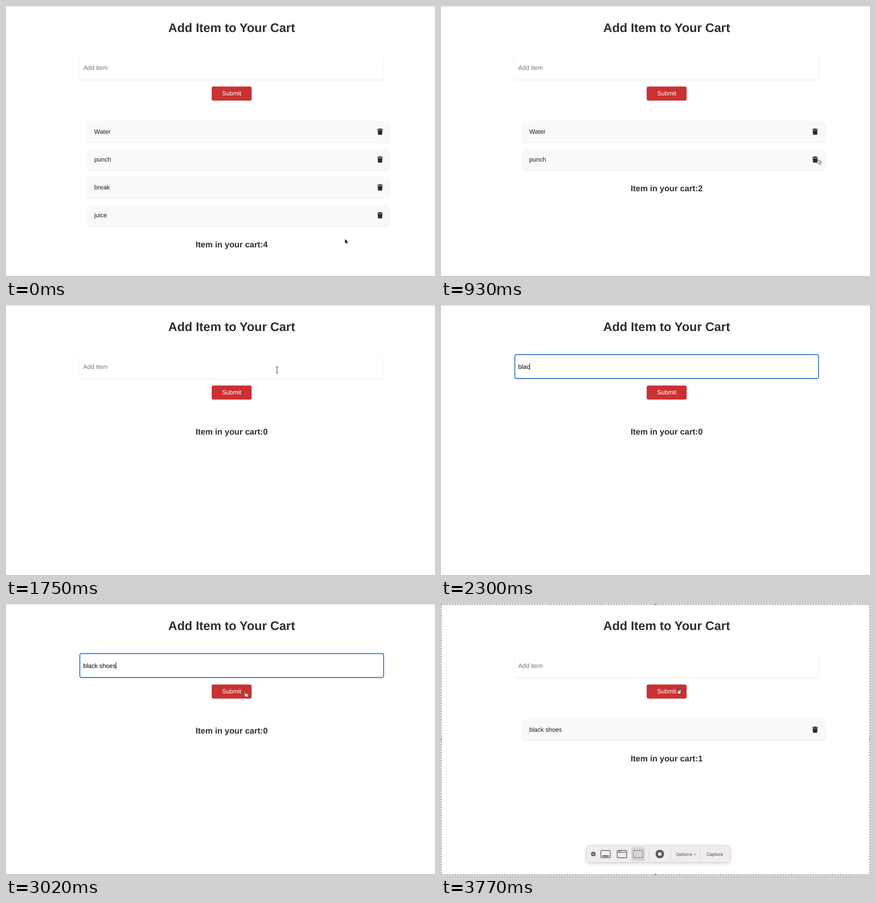
An HTML page for the animation above (4.21 s loop, 942 by 594 pixels).

```html
<!DOCTYPE html>
<html lang="en">
<head>
<meta charset="utf-8">
<title>Cart</title>
<style>
  html, body { margin: 0; width: 100%; height: 100%; overflow: hidden; background: #fff; }
  svg { display: block; font: 13.63px "Liberation Sans", Arial, sans-serif; text-rendering: geometricPrecision; }
  .heading { font-weight: bold; text-anchor: middle; fill: #2e2e2e; }
  .card { filter: drop-shadow(0 1.7px 1.7px rgba(0, 0, 0, .1)); }
  .tool { font: 9.7px Inter, "Open Sans", sans-serif; fill: #484445; }
  .line { fill: none; stroke: #5d5859; stroke-width: 1.4; }
  .rule { stroke: #dcd7d8; }
</style>
</head>
<body>
<svg width="942" height="594" viewBox="0 0 942 594">
  <defs>
    <g id="bin" fill="#2b2b2b">
      <path d="M815.4 269.6h3.2l.8-1.2h4l.8 1.2h3.2v1.8h-12z"/>
      <path d="M816.2 272.3h10.4l-.6 8.6q-.1 1.3-1.4 1.3h-6.4q-1.3 0-1.4-1.3z"/>
    </g>
    <g id="arrow">
      <path d="M0 0V11.2L2.6 8.8 4.3 12.7 6.2 11.9 4.5 8.1H8Z" fill="#000" stroke="#fff" stroke-width=".9"/>
    </g>
    <g id="hand" fill="#fff" stroke="#111" stroke-width=".9" stroke-linejoin="round">
      <path d="M.9 7.4-.9 2.1C-1.4.5.4-.1 1 1.2L2.4 4.8c.6-.7 1.7-.5 2 .2.7-.5 1.7-.2 1.9.5.8-.4 1.8 0 2 .9l.4 2c.2 1.3-.5 2.2-.5 3.4l-5 .6c-.5-1.5-2.8-2.6-4.2-4.3-.6-1 .8-1.7 1.9-.7z"/>
      <path d="M3.4 7.6l.5 2.3M5.1 7.5l.4 2.2M6.7 7.3l.4 2.1" stroke-width=".7"/>
    </g>
    <g id="beam">
      <path d="M-2.6-7q2.6 0 2.6 1.5 0-1.5 2.6-1.5M0-5.5v11M-2.6 7q2.6 0 2.6-1.5 0 1.5 2.6 1.5" fill="none" stroke="#222"/>
    </g>
    <g id="grab" fill="#fff" stroke="#111" stroke-width=".9" stroke-linejoin="round">
      <path d="M-3 1.4-4.3-2.6c-.4-1.3 1.2-1.8 1.7-.6l.6 1.5-.5-3c-.2-1.4 1.5-1.6 1.8-.3l.4 2.8.2-3.3c.1-1.2 1.7-1.2 1.8 0v3.5l.8-2.6c.4-1.2 1.9-.8 1.7.5L3.4 1.6C3.2 3 2.4 3.7 2.4 5.7h-5c-.2-1.5-2.2-2.8-3.3-4.8-.5-1.1.9-1.6 1.7-.7z"/>
      <path d="M-2-1.7l.5 2M-.3-2.2l.2 2.2M1.7-2l-.3 2.1" stroke-width=".7"/>
    </g>
  </defs>

  <path d="M0 1.5H942" stroke="#e2e2e2" stroke-width="1.6"/>
  <path d="M0 593.5H942" stroke="#858585"/>
  <text class="heading" x="495.5" y="57" font-size="27.2">Add Item to Your Cart</text>

  <rect class="card" x="162" y="108" width="667" height="53.3" rx="4" fill="#fff"/>
  <rect id="focus" x="162.2" y="108.7" width="667" height="52.5" rx="3.5" fill="none" stroke="#1962b8" stroke-width="1.7"/>
  <text id="entry" x="169.5" y="139.5"></text>
  <path id="caret" d="M0 127v15.5" stroke="#000"/>

  <rect class="card" x="451.7" y="176.5" width="87.6" height="30.7" rx="3.6" fill="#cb3032"/>
  <text x="495.6" y="196.4" text-anchor="middle" fill="#fff">Submit</text>

  <g id="rows"></g>
  <text id="count" class="heading" x="495.5" font-size="18.25"></text>

  <g id="capture">
    <path d="M0 1.2H942M.5 0V594M941.5 0V594M0 593.3H942" stroke="#fff" stroke-width="1.4"/>
    <path d="M0 1.2H942M.5 0V594M941.5 0V594M0 593.3H942" stroke="#555" stroke-dasharray="3.4 2.6"/>
    <g fill="#777">
      <circle cx="471" r="2.2"/><circle cx="471" cy="593.5" r="2.2"/>
      <circle cy="296.5" r="2.2"/><circle cx="942" cy="296.5" r="2.2"/>
    </g>
    <rect x="319.5" y="529.8" width="315" height="36.7" rx="5.5" fill="#f1edee" stroke="#d3cecf"
      style="filter:drop-shadow(0 2px 4px rgba(0,0,0,.16))"/>
    <circle cx="334.4" cy="548" r="5" fill="#5d5859"/>
    <path d="M332.7 546.3l3.4 3.4m0-3.4l-3.4 3.4" stroke="#f1edee" stroke-width="1.1"/>
    <rect class="line" x="351" y="540.2" width="20.5" height="16" rx="1.8"/>
    <rect x="354" y="551" width="14.5" height="2.8" fill="#5d5859"/>
    <rect class="line" x="387" y="540.2" width="20.7" height="16" rx="1.8"/>
    <path class="line" d="M387 544.4h20.7"/>
    <path class="line" d="M389 542.3h6" stroke-dasharray="1.2 1"/>
    <rect x="418" y="533" width="30" height="30" rx="3.5" fill="#dad5d6"/>
    <rect class="line" x="422.5" y="540.2" width="20.7" height="16" rx="1.5" stroke-dasharray="3.2 1.7"/>
    <circle cx="480.4" cy="548" r="9.4" fill="#5d5859"/>
    <rect x="477" y="544.6" width="6.8" height="6.8" rx="1" fill="#fff"/>
    <path class="rule" d="M456.5 533.5v29M504.5 533.5v29M568.5 530v36"/>
    <text class="tool" x="515.8" y="551.6">Options</text>
    <path class="line" d="M554.2 547.8l2.6 2.4 2.6-2.4" style="stroke-width:1"/>
    <text class="tool" x="583" y="551.6">Capture</text>
  </g>
  <use id="mouse"/>
</svg>
<script>
const LOOP = 4210, STEP = 61.1;
const $ = id => document.getElementById(id);

// [time, value], each holding until the next
const carts = [
  [0, ['Water', 'punch', 'break', 'juice']], [410, ['Water', 'punch', 'break']],
  [750, ['Water', 'punch']], [1060, ['Water']], [1300, []], [3140, ['black shoes']]
];
const phrase = 'black shoes';
const keyTimes = [1910, 2070, 2150, 2240, 2340, 2400, 2450, 2500, 2550, 2610, 2670];

// [time, x, y, pointer shape from then on]
const path = [
  [0, 744, 510, 'arrow'], [20, 746, 508, 'arrow'], [200, 814, 461, 'hand'], [270, 819, 455, 'hand'],
  [480, 819, 455, 'arrow'], [550, 819, 406, 'hand'], [610, 819, 394, 'hand'],
  [780, 819, 394, 'arrow'], [880, 825, 345, 'hand'], [930, 826.5, 334.5, 'hand'],
  [1080, 826.5, 334.5, 'arrow'], [1200, 822, 285, 'hand'], [1270, 820.5, 280.5, 'hand'],
  [1420, 820.5, 280.5, 'arrow'], [1620, 650, 165, 'beam'], [1770, 587, 139, 'beam'],
  [1910, 587, 139, ''], [2700, 587, 139, 'beam'], [2820, 560, 162, 'arrow'],
  [2900, 537, 180, 'hand'], [3020, 523.5, 191.5, 'hand'], [3610, 523.5, 191.5, 'grab']
];

const latest = (list, t) => list.filter(e => e[0] <= t).pop();

function pointer(t) {
  const a = latest(path, t), b = path[path.indexOf(a) + 1] || a;
  const k = b === a ? 0 : (t - a[0]) / (b[0] - a[0]);
  return { x: a[1] + (b[1] - a[1]) * k, y: a[2] + (b[2] - a[2]) * k, shape: a[3] };
}

const show = (id, on) => $(id).setAttribute('visibility', on ? 'visible' : 'hidden');

const row = (name, i) => `<g transform="translate(0 ${i * STEP})">
  <rect class="card" x="178.3" y="252.4" width="664.4" height="46" rx="6.8" fill="#f9f9f9"/>
  <text x="193.7" y="280" fill="#1c1c1c">${name}</text><use href="#bin"/></g>`;

let shown;
function draw(t) {
  const items = latest(carts, t)[1];
  if (items !== shown) {
    shown = items;
    $('rows').innerHTML = items.map(row).join('');
    $('count').textContent = 'Item in your cart:' + items.length;
    $('count').setAttribute('y', 284.2 + items.length * STEP);
  }

  const typed = t < 3140 ? phrase.slice(0, keyTimes.filter(k => k <= t).length) : '';
  const focused = t >= 1770 && t < 3070;
  const entry = $('entry');
  entry.textContent = typed || 'Add item';
  entry.setAttribute('fill', typed ? '#000' : '#757575');
  show('focus', focused);
  show('caret', focused);
  const end = typed ? entry.getComputedTextLength() : 0;
  $('caret').setAttribute('transform', `translate(${169.8 + end} 0)`);

  show('capture', t >= 3610);
  $('capture').setAttribute('opacity', Math.min(1, .3 + (t - 3610) / 220));

  const m = pointer(t);
  show('mouse', m.shape);
  $('mouse').setAttribute('href', '#' + (m.shape || 'arrow'));
  $('mouse').setAttribute('transform', `translate(${m.x} ${m.y})`);
}

const start = performance.now();
function frame() {
  draw((performance.now() - start) % LOOP);
  requestAnimationFrame(frame);
}
frame();
</script>
</body>
</html>
```
